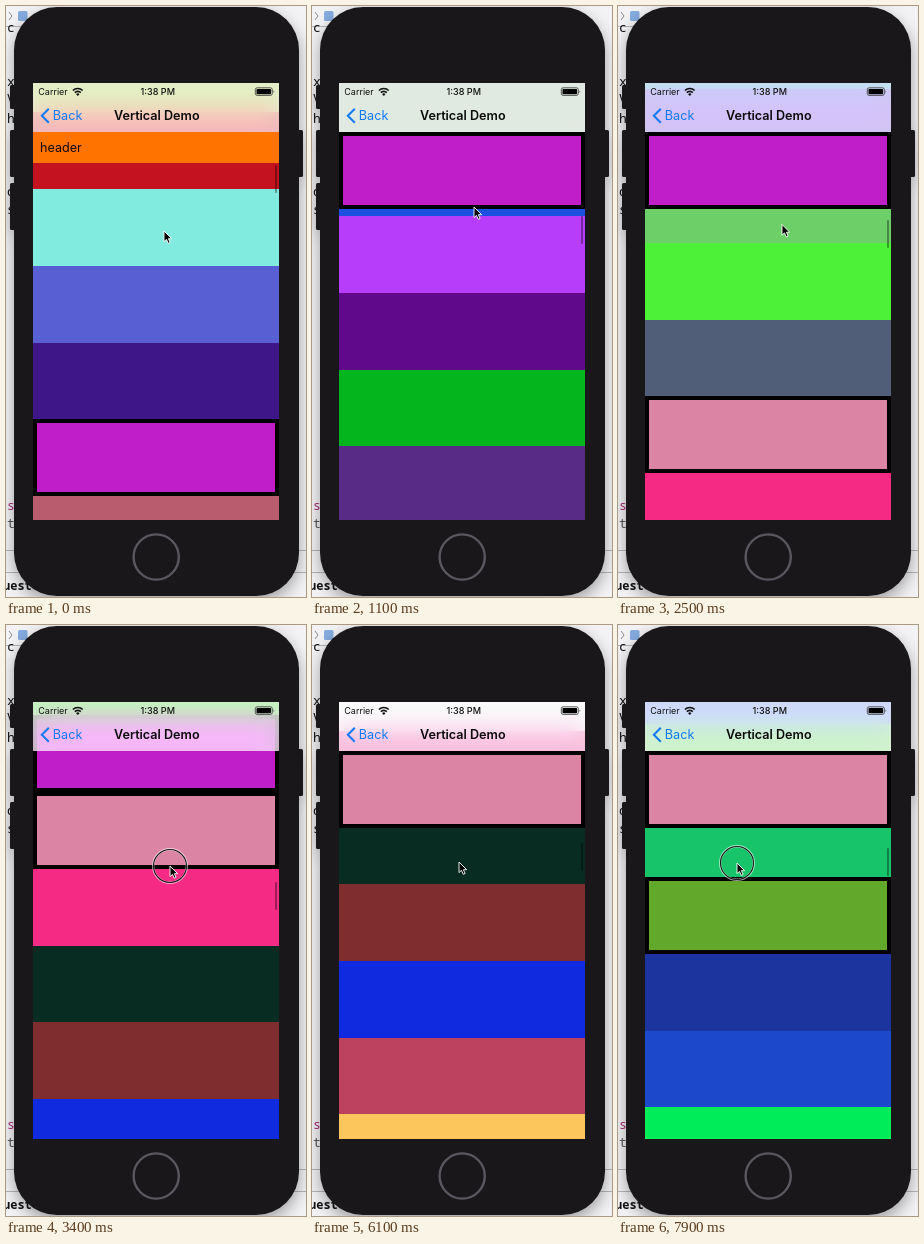
Animation, 300 px wide and 591 px high, one loop 8 s. Source, as an HTML page:

```html
<!DOCTYPE html>
<html lang="en">
<head>
<meta charset="utf-8">
<title>Vertical Demo</title>
<style>
html, body { margin: 0; width: 100%; height: 100%; overflow: hidden; background: #e6e6ea; }
#stage { position: relative; width: 300px; height: 591px; overflow: hidden; }
svg { position: absolute; left: 0; top: 0; font-family: Inter, Roboto, sans-serif; }
#screen { position: absolute; left: 27px; top: 77px; width: 246px; height: 437px; overflow: hidden; isolation: isolate; background: #fff; }
.row { position: absolute; left: 0; top: 0; width: 100%; height: 77px; box-sizing: border-box; }
.sticky { z-index: 1; border: 4px solid #000; }
#header { z-index: 1; height: 31px; background: #ff7300; font: 12.6px/31px Inter, Roboto, sans-serif; color: #160900; padding-left: 7px; }
#thumb { position: absolute; z-index: 2; right: 2px; top: 0; width: 2px; height: 28px; border-radius: 1px; background: rgba(0, 0, 0, .35); }
#bar { position: absolute; z-index: 3; left: 0; top: 0; width: 100%; height: 49px; background: rgba(248, 248, 248, .73);
  -webkit-backdrop-filter: blur(12px) saturate(1.6); backdrop-filter: blur(12px) saturate(1.6); }
#phone { filter: drop-shadow(0 6px 8px rgba(0, 0, 0, .35)); }
</style>
</head>
<body>
<div id="stage">
  <svg width="300" height="591" viewBox="0 0 300 591">
    <rect width="300" height="591" fill="#f3f3f6"/>
    <path d="M0 20.5H30M0 544.5H30M0 566.5H30M270 544.5H300M270 566.5H300" stroke="#b4b4ba"/>
    <rect x="12" y="5" width="9.5" height="10" rx="1.5" fill="#86ade0"/>
    <path d="M3 6l3 4-3 4" fill="none" stroke="#88888e"/>
    <g font-family="Noto Sans Mono, DejaVu Sans Mono, monospace" font-size="13" fill="#111">
      <text x="1" y="26">c</text><text x="1" y="80">x</text><text x="1" y="97">V</text><text x="1" y="117">h</text>
      <text x="1" y="190">d</text><text x="1" y="208">s</text>
      <text x="1" y="504" fill="#a52a72">s</text><text x="1" y="522" fill="#555">t</text>
      <text x="-3" y="584" font-size="12" font-weight="700">uest</text>
    </g>
    <g id="phone" fill="#19171a">
      <rect x="4" y="79" width="8" height="24" rx="1.5"/>
      <rect x="4" y="124" width="8" height="47" rx="1.5"/>
      <rect x="4" y="177" width="8" height="47" rx="1.5"/>
      <rect x="289" y="124" width="8" height="47" rx="1.5"/>
      <rect x="8" y="1" width="285" height="589" rx="43"/>
    </g>
    <circle cx="150.2" cy="551" r="22.6" fill="none" stroke="#5b5760" stroke-width="2.4"/>
  </svg>

  <div id="screen">
    <div id="header" class="row">header</div>
    <div id="thumb"></div>
    <div id="bar"></div>
  </div>

  <svg width="300" height="591" viewBox="0 0 300 591">
    <text x="32.3" y="88.8" font-size="9" fill="#111">Carrier</text>
    <g fill="none" stroke="#111" stroke-width="1.6">
      <path d="M66.9 84.5a7 7 0 0 1 9.8 0M68.8 86.6a4.2 4.2 0 0 1 6 0"/>
    </g>
    <path d="M71.8 90l-1.7-1.8a2.4 2.4 0 0 1 3.4 0z" fill="#111"/>
    <text x="151.7" y="88.8" font-size="9.1" font-weight="500" text-anchor="middle" fill="#111">1:38 PM</text>
    <rect x="249.3" y="81.8" width="17" height="7.6" rx="1.8" fill="none" stroke="#333" stroke-width=".8"/>
    <rect x="250.5" y="83" width="14.6" height="5.2" rx=".8" fill="#000"/>
    <path d="M267.6 84.2q1.4 1.4 0 2.8z" fill="#333"/>
    <path d="M42.8 102.8l-7 7 7 7" fill="none" stroke="#147af3" stroke-width="2"/>
    <text x="46.8" y="114.4" font-size="12.7" fill="#147af3">Back</text>
    <text x="150.8" y="114.4" font-size="12.6" font-weight="600" text-anchor="middle" fill="#0a0a0a">Vertical Demo</text>
    <g id="pointer">
      <g id="touch" fill="none">
        <circle r="16.8" stroke="#fff" stroke-opacity=".6" stroke-width="2.4"/>
        <circle r="16.5" stroke="#151515" stroke-width="1.1"/>
      </g>
      <path d="M0 0V10.6L2.5 8.4 4.2 12.3 6.1 11.5 4.4 7.7H7.7Z" fill="#000" stroke="#fff" stroke-width=".9"/>
    </g>
  </svg>
</div>

<script>
const LOOP = 8000, STEP = 100, ROW = 76.75, HEAD = 30.7, PIN = 126.3, TOP = 77;
// A star marks a row that sticks below the navigation bar.
const colors = `b0d060 c41220 82ebdf 575fd2 3f1688 c01ec8* b95c6e a8c0aa 1b50e0 b83dfa 60098a
  04b51e 582c86 2fbfbb 663ed2 6ccf68 4df238 505e78 db84a4* f52a84 082c22 7f2d2f 102ae0 bd425f
  fcc65c 6a80f0 78d870 18c46a 62a82a* 1c349e 1c48cc 00ec58 8a4fc0`.split(/\s+/);

// time, scroll offset, pointer x, pointer y
const keys = [
  [0, -29.5, 158, 225], [1100, 480.7, 162, 201], [1800, 817.5, 164, 201],
  [3400, 1214.3, 164, 241], [4800, 1222.3, 163, 285], [6100, 1352.7, 147, 237],
  [7900, 1897, 119, 238]
];
const touches = [[2900, 5000], [7300, 8000]];

const $ = id => document.getElementById(id);
const rows = colors.map((c, i) => {
  const el = document.createElement('div');
  const sticky = c.endsWith('*');
  el.className = sticky ? 'row sticky' : 'row';
  el.style.backgroundColor = '#' + c.slice(0, 6);
  $('screen').append(el);
  return { el, sticky, at: i * ROW };
});
const pins = rows.filter(r => r.sticky);

function sample(t) {
  let i = keys.findIndex(k => k[0] > t);
  if (i < 0) i = keys.length;
  const a = keys[i - 1], b = keys[i] || a;
  const p = b === a ? 0 : (t - a[0]) / (b[0] - a[0]);
  return a.map((v, n) => v + (b[n] - v) * p);
}

function place(el, y) {
  el.style.transform = `translateY(${Math.round(y) - TOP}px)`;
}

function draw(t) {
  const [, scroll, x, y] = sample(t);
  for (const r of rows) if (!r.sticky) place(r.el, r.at - scroll);

  // Each pinned row is pushed up by the next one.
  place($('header'), Math.min(PIN, pins[0].at - scroll - HEAD));
  let edge = PIN + HEAD;
  pins.forEach((r, i) => {
    const next = pins[i + 1];
    const limit = next ? next.at - scroll - ROW : Infinity;
    const pos = Math.min(Math.max(r.at - scroll, PIN), limit);
    place(r.el, pos);
    if (r.at - scroll <= PIN + (i ? ROW : HEAD)) edge = pos + ROW;
  });
  place($('thumb'), edge + 2 + (scroll + 29.5) * .0092);

  $('pointer').setAttribute('transform', `translate(${x} ${y})`);
  const down = touches.some(([a, b]) => t >= a && t < b);
  $('touch').style.display = down ? '' : 'none';
}

const start = performance.now();
function tick() {
  const t = (performance.now() - start) % LOOP;
  draw(Math.floor(t / STEP) * STEP);
  requestAnimationFrame(tick);
}
tick();
</script>
</body>
</html>
```
